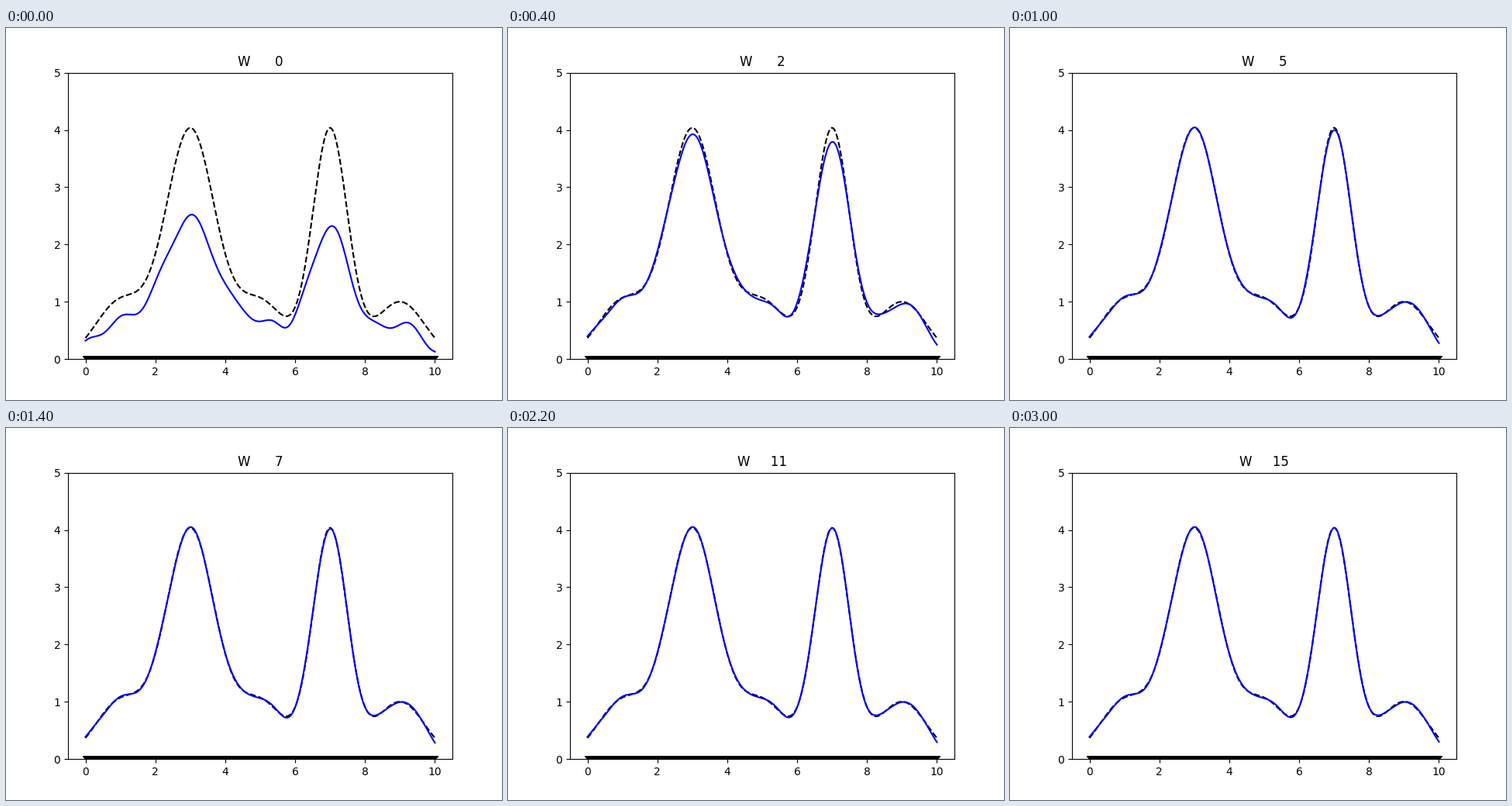
Write a matplotlib script that moves like this. It is 640 px wide and 480 px high and loops after 3.2 s.

```python
import numpy as np
import matplotlib.pyplot as plt
from matplotlib.animation import FuncAnimation

FRAMES = 16
STEP_MS = 200
WIDTH = 0.3       # reach of one training sample
TRAIN_END = 9.9   # no samples beyond this point
DX = 0.01

x = np.arange(-100, 1001) * DX
shown = x >= 0


def bump(center, height=1, sharpness=1):
    return height * np.exp(-sharpness * (x - center)**2)


target = bump(1) + bump(3, 4) + bump(5) + bump(7, 4, 2) + bump(9)

# Ripple left by the spacing of the basis functions, wider near the middle
wave = np.cos(2 * np.pi * (x - 1.05 - bump(5, 0.2)) / 1.03)

# Each training sample corrects its Gaussian neighbourhood
smooth = np.exp(-((x[:, None] - x) / WIDTH)**2 / 2)
smooth *= DX / (WIDTH * np.sqrt(2 * np.pi)) * (x <= TRAIN_END)


def train():
    """Fitted curve after each training pass, starting from zero."""
    error = target.copy()
    fits = []
    for n in range(FRAMES):
        gain = 0.66 if n == 0 else 0.8
        error = error - gain * smooth @ error
        ripple = (0.02 + 0.04 * 0.4**n) * wave
        fits.append((target - error + ripple)[shown])
    return fits


fits = train()
xs = x[shown]

fig, ax = plt.subplots(figsize=(6.4, 4.8), dpi=100)
ax.plot(xs, target[shown], "k--")
curve, = ax.plot(xs, fits[0], "b-")
ax.plot(xs, np.zeros_like(xs), "kx")
ax.set_xlim(-0.5, 10.5)
ax.set_ylim(0, 5)
title = ax.set_title("")


def update(n):
    curve.set_ydata(fits[n])
    title.set_text(f"W {n:6d}")
    return curve, title


anim = FuncAnimation(fig, update, frames=FRAMES, interval=STEP_MS,
                     repeat=True, repeat_delay=0, blit=False)
plt.show()
```
